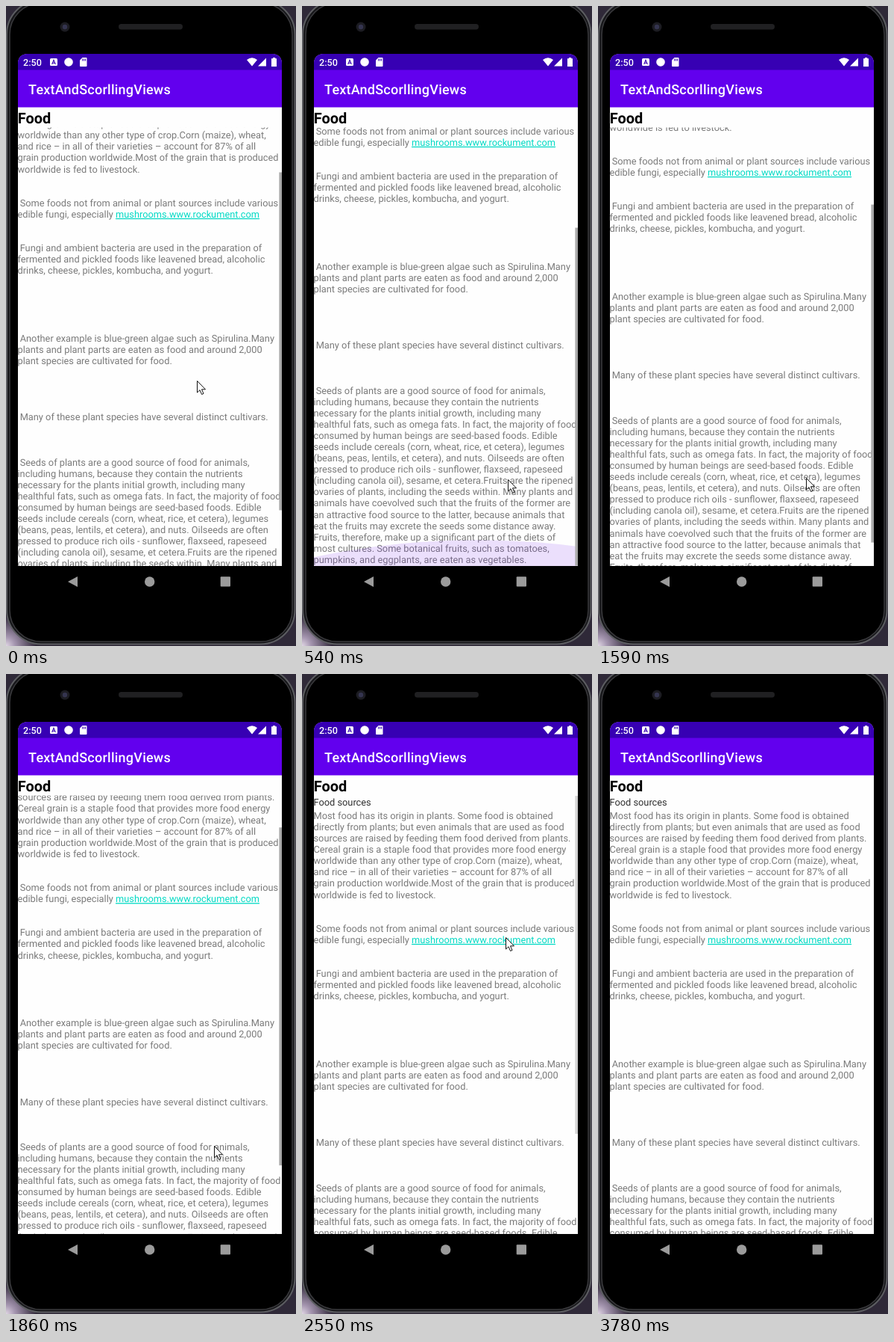
Write an HTML page that moves like this. It is 389 px wide and 856 px high and loops after 3880 ms.

```html
<!DOCTYPE html>
<html lang="en">
<head>
<meta charset="utf-8">
<title>Scrolling text</title>
<style>
  html, body { margin: 0; width: 100%; height: 100%; overflow: hidden; background: #29243a; }
  svg { display: block; width: 389px; height: 856px; }
  text {
    font-family: Roboto, "Liberation Sans", sans-serif; font-size: 12.8px;
    white-space: pre; text-rendering: geometricPrecision;
  }
  #lines { fill: #7a7a7a; }
  .link { fill: #03dac5; text-decoration: underline; }
</style>
</head>
<body>
<svg viewBox="0 0 389 856">
  <defs>
    <radialGradient id="desk" cx="0" cy="1" r="1">
      <stop offset="0" stop-color="#e0d6e4"/>
      <stop offset=".3" stop-color="#a596b0"/>
      <stop offset="1" stop-color="#332a3c"/>
    </radialGradient>
    <clipPath id="screen"><path d="M16 749V78Q16 64 30 64H356Q370 64 370 78V749Z"/></clipPath>
    <clipPath id="view"><rect x="16" y="162.4" width="354" height="586.6"/></clipPath>
  </defs>

  <!-- phone -->
  <rect width="389" height="856" fill="#2f2938"/>
  <rect y="816" width="40" height="40" fill="url(#desk)"/>
  <rect x="1" y="-8" width="386.5" height="861.5" rx="46" fill="#17171a" stroke="#5c5d61" stroke-width="2"/>
  <rect x="5" y="-4" width="379" height="854" rx="42" stroke="#3a3a3d" stroke-width="1.5"/>
  <circle cx="79" cy="28" r="6.5" fill="#1c1c22"/>
  <circle cx="79" cy="28" r="3.2" fill="#34344f"/>
  <rect x="151" y="24" width="86" height="7.5" rx="3.7" fill="#202022"/>

  <!-- screen and bars -->
  <g clip-path="url(#screen)">
    <rect x="16" y="64" width="354" height="685" fill="#fefefe"/>
    <rect x="16" y="64" width="354" height="71.5" fill="#6200ee"/>
    <rect x="16" y="64" width="354" height="21.5" fill="#3700b3"/>
  </g>
  <g fill="#fff">
    <text x="23" y="79.5" style="font-size:12.6px;font-weight:500">2:50</text>
    <rect x="59" y="70" width="10" height="10" rx="1.5"/>
    <path d="M61.7 78L64 72.3L66.3 78M62.6 76.3H65.4" fill="none" stroke="#3700b3" stroke-width="1.1"/>
    <circle cx="84" cy="75" r="5.8"/>
    <path d="M102.5 69H107.5Q108.5 69 108.5 70V80Q108.5 81 107.5 81H100Q99 81 99 80V72.5Z"/>
    <path d="M102.6 70.5V73.5M104.6 70.5V73.5M106.6 70.5V73.5" stroke="#3700b3"/>
    <path d="M323 72Q330 66.5 337 72L330 80.5ZM338 80.5L349 69.5V80.5ZM356 70.3H358V69H361.2V70.3H363V81H356Z"/>
    <text x="30" y="118" style="font-size:18.03px;font-weight:500;letter-spacing:.0125em">TextAndScorllingViews</text>
  </g>
  <text x="15.7" y="157" style="font-size:19.9px;font-weight:700">Food</text>

  <g clip-path="url(#view)">
    <g id="lines"><text x="15.5" y="176.3" fill="#303030">Food sources</text></g>
    <path id="glow" d="M-31 0A531 531 0 0 1 500 0Z" fill="#6200ee" opacity=".12"/>
    <rect id="bar" x="366.4" width="3.6" height="452" fill="#a9a9a9"/>
  </g>

  <g fill="#9b9b9b">
    <path d="M83 770L96 763V777Z"/>
    <circle cx="192.7" cy="770" r="6.7"/>
    <rect x="287.7" y="763.3" width="13.3" height="13.3" rx="1"/>
  </g>
  <path id="cursor" d="M.5 .5V16L4 12.7L6.6 18.5L9 17.4L6.5 11.8H11.5Z" fill="#fff" stroke="#111"/>
</svg>

<script>
const article = `Most food has its origin in plants. Some food is obtained
directly from plants; but even animals that are used as food
sources are raised by feeding them food derived from plants.
Cereal grain is a staple food that provides more food energy
worldwide than any other type of crop.Corn (maize), wheat,
and rice – in all of their varieties – account for 87% of all
grain production worldwide.Most of the grain that is produced
worldwide is fed to livestock.


 Some foods not from animal or plant sources include various
edible fungi, especially mushrooms.www.rockument.com


 Fungi and ambient bacteria are used in the preparation of
fermented and pickled foods like leavened bread, alcoholic
drinks, cheese, pickles, kombucha, and yogurt.





 Another example is blue-green algae such as Spirulina.Many
plants and plant parts are eaten as food and around 2,000
plant species are cultivated for food.




 Many of these plant species have several distinct cultivars.



 Seeds of plants are a good source of food for animals,
including humans, because they contain the nutrients
necessary for the plants initial growth, including many
healthful fats, such as omega fats. In fact, the majority of food
consumed by human beings are seed-based foods. Edible
seeds include cereals (corn, wheat, rice, et cetera), legumes
(beans, peas, lentils, et cetera), and nuts. Oilseeds are often
pressed to produce rich oils - sunflower, flaxseed, rapeseed
(including canola oil), sesame, et cetera.Fruits are the ripened
ovaries of plants, including the seeds within. Many plants and
animals have coevolved such that the fruits of the former are
an attractive food source to the latter, because animals that
eat the fruits may excrete the seeds some distance away.
Fruits, therefore, make up a significant part of the diets of
most cultures. Some botanical fruits, such as tomatoes,
pumpkins, and eggplants, are eaten as vegetables.`;

const $ = id => document.getElementById(id);
const lines = $('lines'), glow = $('glow'), bar = $('bar'), cursor = $('cursor');
const LOOP = 3880, STEP = 132.5; // each picture is held for one step
const LINE = 15.08, START = 77, END = 173, GLOW = 36;

lines.innerHTML += article.split('\n').map((line, i) =>
  `<text x="15.5" y="${194 + i * LINE}">${line.replace(/mushrooms\S+/, '<tspan class="link">$&</tspan>')}</text>`
).join('');

const clamp = v => Math.min(1, Math.max(0, v));
const smooth = v => v * v * (3 - 2 * v);

// All motion is a function of the step number n.
function scrollAt(n) {
  if (n < 10) return END - (END - START) * (1 - clamp(n / 4)) ** 1.5;
  return END * (1 - smooth(clamp((n - 10) / 6.4)));
}

// The scroll bar fades once each of the two scrolls has settled.
const barAlpha = n => clamp(1 - (n - (n < 11 ? 8.5 : 17.5)) / 3);

// The edge glow appears on reaching the end, then sinks.
const glowHeight = n => n < 4 || n > 8 ? 0 : GLOW * Math.cos((n - 4.6) / 3.4 * Math.PI / 2);

// Pointer stops: step, x, y
const stops = [[0, 256, 501], [4, 276, 633], [5, 279, 631], [17, 279, 631], [19, 273, 352],
  [20, 273, 352], [21, 182, 372], [22, 336, 354], [24, 90, 699], [25, 86, 702]];

function pointerAt(n) {
  const next = stops.findIndex(s => s[0] > n);
  if (next < 0) return null;
  const a = stops[next - 1], b = stops[next], u = (n - a[0]) / (b[0] - a[0]);
  return [a[1] + (b[1] - a[1]) * u, a[2] + (b[2] - a[2]) * u];
}

function draw() {
  const n = Math.floor(performance.now() % LOOP / STEP);
  const y = scrollAt(n), point = pointerAt(n);
  lines.setAttribute('transform', `translate(0 ${-y})`);
  bar.setAttribute('y', 163 + y * .772);
  bar.setAttribute('opacity', barAlpha(n));
  glow.setAttribute('transform', `translate(0 749) scale(1 ${glowHeight(n) / 71})`);
  cursor.setAttribute('visibility', point ? 'visible' : 'hidden');
  if (point) cursor.setAttribute('transform', `translate(${point})`);
  requestAnimationFrame(draw);
}
draw();
</script>
</body>
</html>
```
